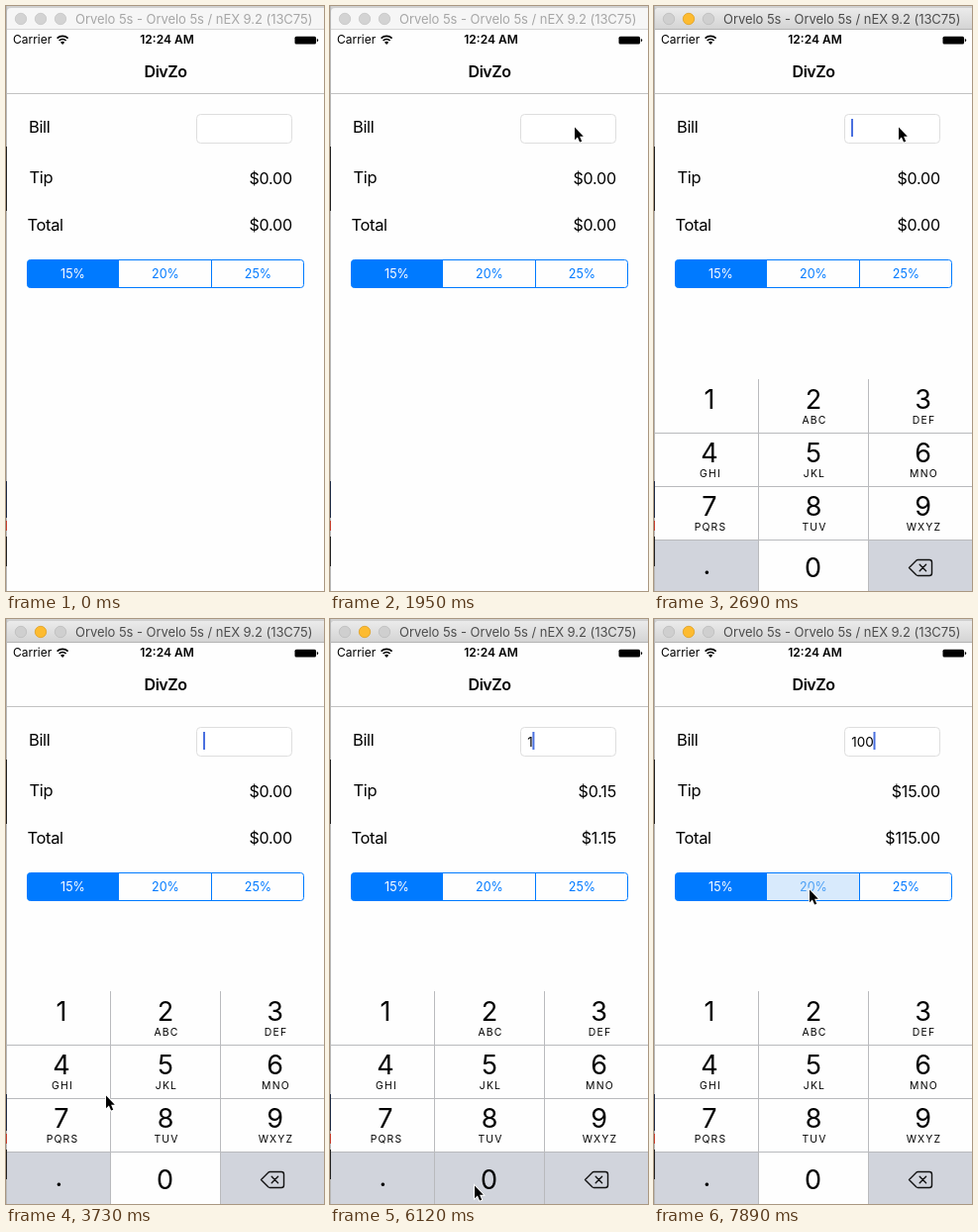
Recreate the animation shown at these times as an HTML page. Size 321 by 591 pixels, loop 8000 ms.

```html
<!DOCTYPE html>
<html lang="en">
<head>
<meta charset="utf-8">
<title>Tip calculator</title>
<style>
html, body { margin: 0; width: 100%; height: 100%; overflow: hidden; background: #fff; }
svg { display: block; width: 100%; height: 100%; font-family: Inter, Roboto, sans-serif; fill: #000; }
.mid { text-anchor: middle; }
.end { text-anchor: end; }
.label { font-size: 16.5px; letter-spacing: -.35px; }
.money { font-size: 16px; letter-spacing: -.15px; }
.bill { font-size: 13.5px; }
.seg { font-size: 12.5px; fill: #007aff; }
.title { font-size: 13px; letter-spacing: -.05px; }
.digit { font-size: 27px; }
.abc { font-size: 10.4px; letter-spacing: 1.2px; }
.line { fill: none; stroke: #b9babd; }

/* every change lands on a hard step of the 8 s loop */
.live, .state, .press, .pick, #caret, #arrow, #pad { animation: 8s step-end infinite; }
.live { animation-name: live; }
.s0 { animation-name: s0; }
.s1 { animation-name: s1; }
.s10 { animation-name: s10; }
.s100 { animation-name: s100; }
.press1 { animation-name: press1; }
.press0 { animation-name: press0; }
.pick { animation-name: pick; }
#caret { animation-name: caret; }
#arrow { animation-name: arrow; }
#pad { animation-name: pad; }

@keyframes live { 0% { opacity: 0 } 27.95%, 100% { opacity: 1 } }
@keyframes s0 { 0% { opacity: 1 } 67.2%, 100% { opacity: 0 } }
@keyframes s1 { 0% { opacity: 0 } 67.2% { opacity: 1 } 78.3%, 100% { opacity: 0 } }
@keyframes s10 { 0% { opacity: 0 } 78.3% { opacity: 1 } 81.95%, 100% { opacity: 0 } }
@keyframes s100 { 0% { opacity: 0 } 81.95%, 100% { opacity: 1 } }
@keyframes press1 { 0% { opacity: 0 } 65.3% { opacity: 1 } 67.2%, 100% { opacity: 0 } }
@keyframes press0 {
  0%, 78.3% { opacity: 0 }
  76.45%, 80.2% { opacity: 1 }
  81.95%, 100% { opacity: 0 }
}
@keyframes pick { 0% { opacity: 0 } 98.55%, 100% { opacity: 1 } }
@keyframes caret {
  0% { opacity: 0; transform: none }
  29.8%, 42.8%, 55.95% { opacity: 1 }
  37.3%, 48.4%, 61.55% { opacity: 0 }
  67.2% { opacity: 1; transform: translateX(5.4px) }
  78.3% { transform: translateX(14px) }
  81.95% { transform: translateX(22.5px) }
  89.4% { opacity: 0 }
  94.8%, 100% { opacity: 1; transform: translateX(22.5px) }
}
@keyframes pad {
  0% { transform: translateY(215px) }
  29.8% { transform: translateY(90px) }
  31.7% { transform: translateY(10px) }
  33.55% { transform: translateY(1px) }
  35.45%, 100% { transform: none }
}
@keyframes arrow {
  0% { transform: translate(340px, 590px) }
  7.45% { transform: translate(315px, 563px) }
  9.3% { transform: translate(314px, 500px) }
  11.2% { transform: translate(312px, 405px) }
  13.1% { transform: translate(302px, 295px) }
  14.95% { transform: translate(286px, 200px) }
  16.8% { transform: translate(269px, 142px) }
  18.7% { transform: translate(260px, 123px) }
  20.55% { transform: translate(254px, 122px) }
  22.45% { transform: translate(249px, 121px) }
  24.3% { transform: translate(246px, 121px) }
  42.8% { transform: translate(226px, 175px) }
  44.7% { transform: translate(170px, 330px) }
  46.55% { transform: translate(100px, 480px) }
  48.4% { transform: translate(48px, 529px) }
  50.3% { transform: translate(22px, 480px) }
  52.15% { transform: translate(17px, 425px) }
  54.05% { transform: translate(40px, 407px) }
  61.55% { transform: translate(53px, 403px) }
  68.9% { transform: translate(62px, 430px) }
  70.8% { transform: translate(98px, 503px) }
  72.7% { transform: translate(132px, 558px) }
  74.55% { transform: translate(145px, 571px) }
  83.8% { transform: translate(148px, 570px) }
  87.55% { transform: translate(149px, 538px) }
  89.4% { transform: translate(152px, 470px) }
  91.3% { transform: translate(156px, 372px) }
  93.05% { transform: translate(157px, 296px) }
  94.8%, 100% { transform: translate(156px, 272px) }
}
</style>
</head>
<body>
<svg viewBox="0 0 321 591">
  <defs>
    <linearGradient id="bar" x2="0" y2="1">
      <stop stop-color="#ebebeb"/><stop offset="1" stop-color="#d3d3d3"/>
    </linearGradient>
  </defs>

  <!-- desktop edge -->
  <rect width="321" height="591" fill="#d0d0d0"/>
  <g>
    <rect width="1" height="591" fill="#b8b8b8"/>
    <rect y="142" width="1" height="65" fill="#222"/>
    <rect y="480" width="1" height="37" fill="#1d2b45"/>
    <rect y="520" width="1" height="10" fill="#c8402f"/>
    <rect y="536" width="1" height="30" fill="#222"/>
  </g>
  <rect x="1" y="24" width="320" height="567" fill="#fefefe"/>

  <!-- window bar -->
  <path d="M1 24V6q0-4 4-4H321V24Z" fill="#f6f6f6"/>
  <path d="M1 23.5H321" stroke="#d6d6d6"/>
  <g fill="#d3d3d3" stroke="#c6c6c6" stroke-width=".8">
    <circle cx="15" cy="13" r="5.7"/><circle cx="35" cy="13" r="5.7"/><circle cx="55" cy="13" r="5.7"/>
  </g>
  <text class="title" x="70" y="18" fill="#a6a6a6">Orvelo 5s - Orvelo 5s / nEX 9.2 (13C75)</text>
  <g class="live">
    <path d="M1 24V6q0-4 4-4H321V24Z" fill="url(#bar)"/>
    <path d="M1 23.5H321" stroke="#b4b4b4"/>
    <g fill="#cfcfcf" stroke="#bdbdbd" stroke-width=".8">
      <circle cx="15" cy="13" r="5.7"/><circle cx="55" cy="13" r="5.7"/>
      <circle cx="35" cy="13" r="5.7" fill="#fdbb30" stroke="#dfa023"/>
    </g>
    <text class="title" x="70" y="18" fill="#4c4c4c">Orvelo 5s - Orvelo 5s / nEX 9.2 (13C75)</text>
  </g>

  <!-- status and navigation bars -->
  <text x="7" y="38.3" font-size="12">Carrier</text>
  <g fill="none" stroke="#000" stroke-width="1.7">
    <path d="M51.6 32.6a8 8 0 0 1 11 0M53.6 35a5 5 0 0 1 7 0"/>
    <path d="M57.1 39L55 36.8a3 3 0 0 1 4.2 0Z" fill="#000" stroke="none"/>
  </g>
  <text class="mid" x="162.5" y="38.3" font-size="12" font-weight="600">12:24 AM</text>
  <rect x="291.5" y="30.8" width="21.5" height="7.7" rx="1.5"/>
  <path d="M313.8 32.9q1.4 0 1.4 1.7t-1.4 1.7Z"/>
  <text class="mid" x="161" y="72" font-size="16" font-weight="600" letter-spacing="-.5">DivZo</text>
  <path d="M1 88.5H321" stroke="#c2c2c2"/>

  <!-- form -->
  <g class="label">
    <text x="23" y="128">Bill</text>
    <text x="23.5" y="179">Tip</text>
    <text x="21.5" y="226.5">Total</text>
  </g>
  <rect x="192.5" y="109.5" width="96" height="29" rx="4" fill="#fff" stroke="#dedede"/>
  <g id="sums"></g>
  <rect id="caret" x="199" y="114" width="2" height="18" fill="#4a70df"/>

  <!-- segments -->
  <path d="M114 256.5H24.5q-3 0-3 3V281.5q0 3 3 3H114Z" fill="#007aff"/>
  <rect x="21.5" y="256.5" width="279" height="28" rx="3" fill="none" stroke="#007aff"/>
  <path d="M113.5 257V284M207.5 257V284" stroke="#007aff"/>
  <g class="seg mid">
    <text x="67.5" y="275" style="fill:#fff">15%</text>
    <text x="161" y="275">20%</text>
    <text x="254.5" y="275">25%</text>
    <g class="pick">
      <rect x="114" y="257" width="93" height="27" fill="#d8eafc"/>
      <text x="161" y="275" style="fill:#4a9ff5">20%</text>
    </g>
  </g>

  <!-- number pad -->
  <g id="pad">
    <rect x="1" y="376" width="320" height="216" fill="#fefefe"/>
    <path d="M1 539H105V592H1ZM217 539H321V592H217Z" fill="#d1d4dc"/>
    <rect class="press press1" x="1" y="376" width="104" height="54" fill="#d1d4dc"/>
    <rect class="press press0" x="106" y="539" width="110" height="53" fill="#d1d4dc"/>
    <path class="line" d="M1 430.5H321M1 484.5H321M1 538.5H321M105.5 376V592M216.5 376V592"/>
    <g id="keys" class="mid"></g>
    <g fill="none" stroke="#111" stroke-width="1.4" stroke-linejoin="round" stroke-linecap="round">
      <path d="M257.5 566.5L264.5 559.4Q265.3 558.5 266.5 558.5H278Q280.5 558.5 280.5 561V572Q280.5 574.5 278 574.5H266.5Q265.3 574.5 264.5 573.6Z"/>
      <path d="M268.2 563.3L274.6 569.7M274.6 563.3L268.2 569.7"/>
    </g>
  </g>

  <path id="arrow" d="M1 1.5V14.2L3.9 11.5L6.1 16.6L8.2 15.7L6.1 10.8H9.8Z" stroke="#fff" stroke-width="1.8" paint-order="stroke"/>
</svg>
<script>
const put = (id, html) => document.getElementById(id).innerHTML = html.join('');
const usd = n => '$' + n.toFixed(2);

put('sums', [0, 1, 10, 100].map(bill => `<g class="state s${bill}">
  <text class="bill" x="199.2" y="128.5">${bill || ''}</text>
  <text class="money end" x="289" y="179.5">${usd(bill * .15)}</text>
  <text class="money end" x="289" y="226.5">${usd(bill * 1.15)}</text></g>`));

const names = ['', 'ABC', 'DEF', 'GHI', 'JKL', 'MNO', 'PQRS', 'TUV', 'WXYZ'];
const cols = [56, 161, 271.5];
const keys = names.map((abc, i) => {
  const x = cols[i % 3], y = 376 + 54 * Math.floor(i / 3);
  return `<text class="digit" x="${x}" y="${y + 30}">${i + 1}</text>
    <text class="abc" x="${x + 1}" y="${y + 45}">${abc}</text>`;
});
put('keys', [...keys,
  '<text class="digit" x="160.5" y="575.5">0</text>',
  '<text class="digit" x="53.5" y="573">.</text>']);
</script>
</body>
</html>
```
